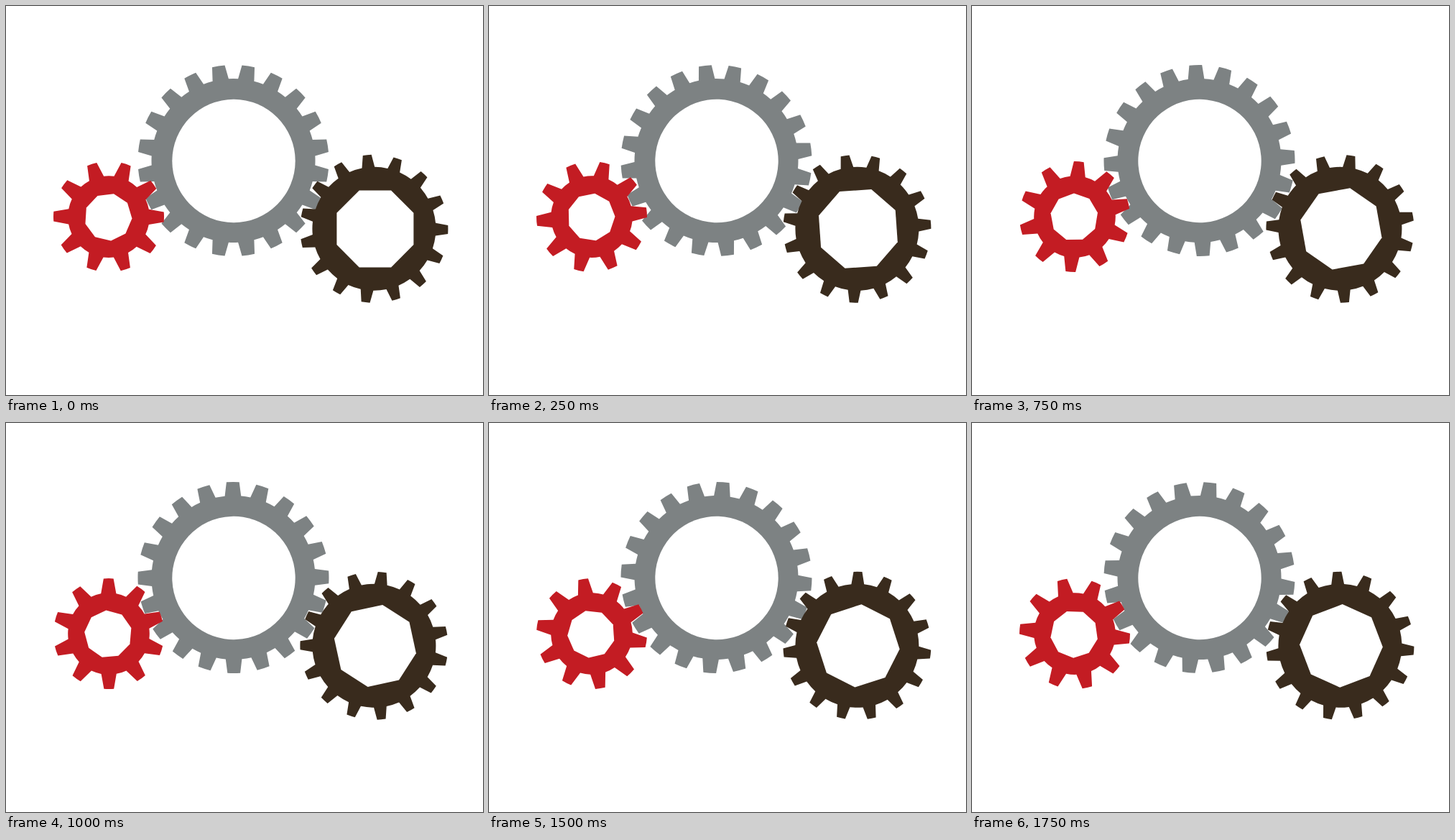
Animation of 664x541 px, one loop 2 s. Source, as an HTML page:

```html
<!DOCTYPE html>
<html lang="en">
<head>
<meta charset="utf-8">
<title>Gears</title>
<style>
  html, body { margin: 0; width: 100%; height: 100%; overflow: hidden; background: #fff; }
  svg { display: block; width: 664px; height: 541px; }
</style>
</head>
<body>
<svg id="stage" viewBox="0 0 664 541"></svg>
<script>
const NS = 'http://www.w3.org/2000/svg';
const LOOP = 2000;
const STEPS = 8;
const stage = document.getElementById('stage');

// tip and base are half widths of a tooth; turn holds the angle at each step.
// The holes sit slightly off the centre of the teeth.
const gears = [
  { x: 316.5, y: 215, color: '#7d8283', teeth: 20, phase: 9,
    outer: 133, root: 114, tip: 8.9, base: 11.3,
    hole: { x: 317, y: 215.5, r: 85.7 },
    turn: [0, 2.25, 4.5, 6.75, 8.7, 10.5, 13, 15.4] },
  { x: 143, y: 293.1, color: '#c31c23', teeth: 10, phase: 0.3,
    outer: 77, root: 56.8, tip: 6.9, base: 10.6,
    hole: { x: 142.3, y: 293.6, r: 33.2, sides: 9, phase: 13.4 },
    turn: [0, -4.7, -9.4, -14, -18.5, -23, -27.2, -31.4] },
  { x: 512.4, y: 309.8, color: '#392b1d', teeth: 15, phase: 0.6,
    outer: 103, root: 86, tip: 6, base: 8.9,
    hole: { x: 513.9, y: 309.9, r: 57.9, sides: 8, phase: 22.5 },
    turn: [0, -4, -8, -10.2, -12.3, -14.5, -18, -20.8] }
];

const rad = deg => deg * Math.PI / 180;
const polar = (r, a) => `${(r * Math.cos(a)).toFixed(2)} ${(r * Math.sin(a)).toFixed(2)}`;

function gearPath(g) {
  const tip = Math.asin(g.tip / g.outer);
  const base = Math.asin(g.base / g.root);
  let d = '';
  for (let i = 0; i < g.teeth; i++) {
    const a = rad(g.phase + i * 360 / g.teeth);
    d += i ? `A${g.root} ${g.root} 0 0 1 ` : 'M';
    d += `${polar(g.root, a - base)}L${polar(g.outer, a - tip)}`;
    d += `A${g.outer} ${g.outer} 0 0 1 ${polar(g.outer, a + tip)}L${polar(g.root, a + base)}`;
  }
  return d + `A${g.root} ${g.root} 0 0 1 ${polar(g.root, rad(g.phase) - base)}Z`;
}

function holePath({ r, sides, phase }) {
  if (!sides) return `M${r} 0A${r} ${r} 0 1 1 ${-r} 0A${r} ${r} 0 1 1 ${r} 0Z`;
  const points = Array.from({ length: sides },
    (_, i) => polar(r, rad(phase - 90 + i * 360 / sides)));
  return `M${points.join('L')}Z`;
}

function addPath(d, fill) {
  const node = document.createElementNS(NS, 'path');
  node.setAttribute('d', d);
  node.setAttribute('fill', fill);
  stage.append(node);
  return node;
}

function place(part, angle) {
  part.node.setAttribute('transform', `translate(${part.x} ${part.y}) rotate(${angle})`);
}

for (const g of gears) {
  g.node = addPath(gearPath(g), g.color);
  g.hole.node = addPath(holePath(g.hole), '#fff');
}

function draw() {
  const step = Math.floor(performance.now() % LOOP / LOOP * STEPS);
  for (const g of gears) {
    place(g, g.turn[step]);
    place(g.hole, g.turn[step]);
  }
  requestAnimationFrame(draw);
}
draw();
</script>
</body>
</html>
```
